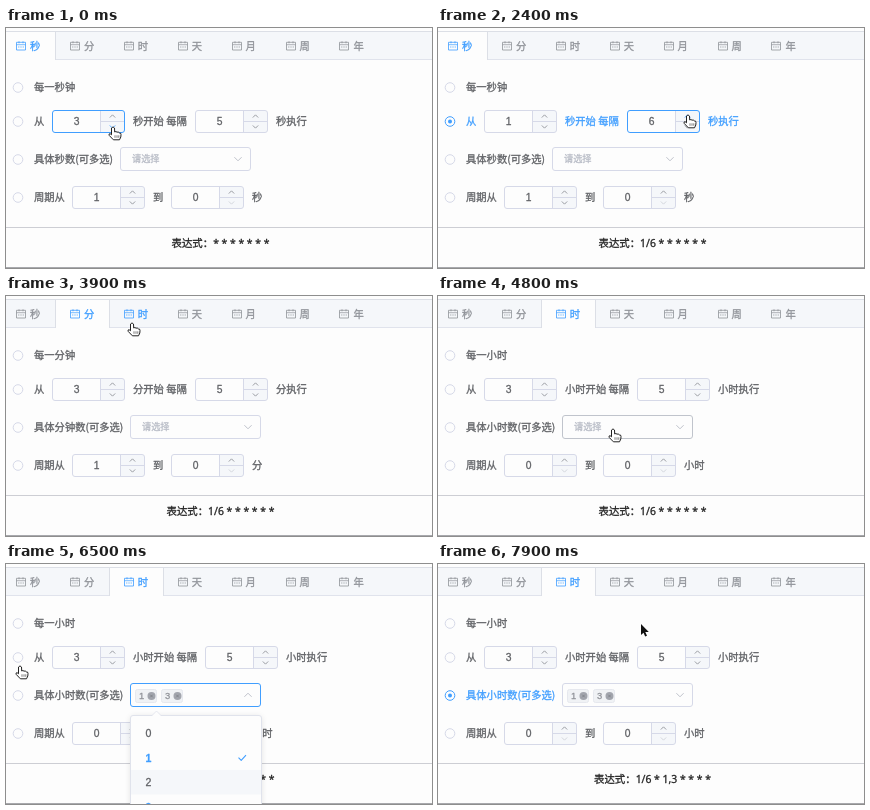
Animation, 426 px wide and 240 px high, one loop 8 s. Source, as an HTML page with a canvas:

```html
<!DOCTYPE html>
<html lang="zh">
<head>
<meta charset="utf-8">
<style>
html, body { margin: 0; width: 100%; height: 100%; overflow: hidden; background: #fdfdfd; }
canvas { display: block; width: 426px; height: 240px; }
</style>
</head>
<body>
<canvas id="stage"></canvas>
<script>
const W = 426, H = 240, LOOP = 8000, STEP = 100;
const BLUE = '#409eff', TEXT = '#606266', GREY = '#909399', PALE = '#b8bcc6',
      EDGE = '#d6d9e8', FILL = '#f5f7fa', PAGE = '#fdfdfd';
const CJK = '"Noto Sans CJK SC", "Noto Sans CJK", "Noto Sans CJK JP", sans-serif';
const SANS = '"Liberation Sans", Arial, sans-serif';
const canvas = document.getElementById('stage');
const g = canvas.getContext('2d');
const dpr = window.devicePixelRatio || 1;
canvas.width = W * dpr;
canvas.height = H * dpr;

// Pointer stops: time, x, y
const route = [
  [0, 107, 99], [1500, 107, 99], [2100, 250, 87], [2700, 250, 87],
  [3350, 82, 20], [3550, 82, 20], [3900, 126, 27], [4250, 132, 24],
  [4750, 175, 133], [5150, 175, 133], [5450, 152, 192], [5700, 152, 192],
  [5950, 150, 244], [6150, 150, 244], [6500, 14, 102], [6700, 12, 130],
  [7050, 12, 130], [7750, 203, 60], [8000, 203, 60]
];

function pointerAt(t) {
  let i = 0;
  while (i < route.length - 2 && route[i + 1][0] <= t) i++;
  const [t0, x0, y0] = route[i], [t1, x1, y1] = route[i + 1];
  const p = (t - t0) / (t1 - t0), e = p * p * (3 - 2 * p);
  return { x: x0 + (x1 - x0) * e, y: y0 + (y1 - y0) * e };
}

function stateAt(t) {
  const tab = t < 3500 ? 0 : t < 4200 ? 1 : 2;
  const from = tab ? 3 : t < 400 ? 3 : t < 800 ? 2 : 1;
  const every = !tab && t >= 2300 ? 6 : 5;
  const done = t >= 6900;
  const picks = [];
  if (t >= 5600) picks.push(1);
  if (t >= 6000) picks.push(3);
  const head = t < 400 ? '*' : t < 800 ? '2/5' : t < 2300 ? '1/5' : '1/6';
  const expr = [head, '*', done ? '1,3' : '*', '*', '*', '*', '*'].join(' ');
  const selected = tab === 0 && t >= 400 ? 1 : tab === 2 && done ? 2 : -1;
  const open = Math.max(0, Math.min(1, (t - 5000) / 200, (7100 - t) / 200));
  return { t, tab, from, every, picks, expr, selected, open, mouse: pointerAt(t) };
}

// A hairline outline gives the text a medium weight
function text(s, x, y, color, size = 10.3, weight = 500, family = CJK, align = 'left') {
  g.font = `${weight} ${size}px ${family}`;
  g.textAlign = align;
  g.textBaseline = 'alphabetic';
  g.fillStyle = g.strokeStyle = color;
  g.lineWidth = 0.3;
  g.lineJoin = 'round';
  g.fillText(s, x, y + size * 0.37);
  g.strokeText(s, x, y + size * 0.37);
}

function rect(x, y, w, h, color) {
  g.fillStyle = color;
  g.fillRect(x, y, w, h);
}

function frame(x, y, w, h, r, fill, stroke) {
  g.beginPath();
  g.roundRect(x + 0.5, y + 0.5, w - 1, h - 1, r);
  if (fill) { g.fillStyle = fill; g.fill(); }
  if (stroke) { g.strokeStyle = stroke; g.lineWidth = 1; g.stroke(); }
}

function line(points, color, width = 1) {
  g.beginPath();
  points.forEach(([x, y]) => g.lineTo(x, y));
  g.strokeStyle = color;
  g.lineWidth = width;
  g.stroke();
}

function disc(x, y, r, color) {
  g.beginPath();
  g.arc(x, y, r, 0, 7);
  g.fillStyle = color;
  g.fill();
}

// dir 1 points down, -1 up
function chevron(x, y, w, dir, color) {
  const h = w / 2 * dir;
  line([[x - w, y - h], [x, y + h], [x + w, y - h]], color, 0.9);
}

function calendar(x, y, color) {
  g.beginPath();
  g.rect(x + 0.5, y + 1.3, 9, 7.7);
  g.strokeStyle = color;
  g.lineWidth = 0.8;
  g.stroke();
  line([[x + 0.5, y + 3.7], [x + 9.5, y + 3.7]], color, 0.7);
  for (const dx of [3, 7]) line([[x + dx, y + 0.3], [x + dx, y + 2.3]], color, 0.8);
  for (const dx of [2.3, 4.5, 6.7]) rect(x + dx, y + 5.5, 1, 1, color);
}

function drawTabs(s) {
  rect(0, 3, W, 29, FILL);
  rect(0, 3, W, 1, '#dcdfe6');
  rect(0, 31, W, 1, '#e0e3ec');
  const pitch = 53.9, left = s.tab ? Math.round(49 + pitch * (s.tab - 1)) : 0;
  const right = Math.round(50 + pitch * s.tab);
  rect(left, 4, right - left, 28, PAGE);
  rect(right - 1, 4, 1, 28, '#dcdfe6');
  if (s.tab) rect(left, 4, 1, 28, '#dcdfe6');
  const over = s.mouse.y > 3 && s.mouse.y < 31 ? Math.floor((s.mouse.x + 5) / pitch) : -1;
  [...'秒分时天月周年'].forEach((name, i) => {
    const x = 10 + pitch * i, color = i === s.tab || i === over ? BLUE : GREY;
    calendar(Math.round(x), 13, color);
    text(name, x + 14, 18, color);
  });
}

function radio(y, on) {
  g.beginPath();
  g.arc(12, y, 4.8, 0, 7);
  g.fillStyle = PAGE;
  g.fill();
  g.strokeStyle = on ? BLUE : EDGE;
  g.lineWidth = 1;
  g.stroke();
  if (on) disc(12, y, 2, BLUE);
}

function stepper(x, y, value, s, atMin) {
  const m = s.mouse, mid = y + 11.5;
  const hot = m.x > x + 48 && m.x < x + 73 && m.y > y && m.y < y + 23;
  frame(x, y, 73, 23, 2.5, PAGE, null);
  rect(x + 48, y + 1, 24, 21, FILL);
  rect(x + 48, y + 1, 1, 21, EDGE);
  rect(x + 48, y + 11, 24, 1, EDGE);
  frame(x, y, 73, 23, 2.5, null, hot ? BLUE : EDGE);
  chevron(x + 60.5, y + 6.2, 2.7, -1, hot && m.y < mid ? BLUE : GREY);
  chevron(x + 60.5, y + 16.8, 2.7, 1, atMin ? '#d0d3da' : hot && m.y >= mid ? BLUE : GREY);
  text(value, x + 24.5, mid, TEXT, 10.3, 400, SANS, 'center');
}

function tag(x, value) {
  frame(x, 125, 22, 14, 2, '#f0f2f5', '#e6e8ee');
  text(value, x + 4, 131.8, GREY, 9.4, 400, SANS);
  const cx = x + 16.5;
  disc(cx, 132, 4, '#a2a5ad');
  line([[cx - 1.3, 130.7], [cx + 1.3, 133.3]], '#777a82', 0.7);
  line([[cx + 1.3, 130.7], [cx - 1.3, 133.3]], '#777a82', 0.7);
}

function select(x, s) {
  const m = s.mouse, open = s.open > 0 && s.t < 6900;
  const over = m.x > x && m.x < x + 131 && m.y > 119 && m.y < 143;
  frame(x, 119, 131, 24, 2.5, PAGE, open ? BLUE : over ? '#c0c4cc' : EDGE);
  if (s.picks.length) s.picks.forEach((p, i) => tag(x + 5 + 26 * i, p));
  else text('请选择', x + 12, 131, PALE, 9.2, 400);
  chevron(x + 118, 131, 3.6, open ? -1 : 1, PALE);
}

function drawRows(s) {
  const unit = ['秒', '分', '小时'][s.tab], long = ['秒钟', '分钟', '小时'][s.tab];
  const counted = ['秒', '分钟', '小时'][s.tab];
  const shift = s.tab === 2 ? 10 : 0;
  const hue = i => i === s.selected ? BLUE : TEXT;
  [59, 93, 131, 169].forEach((y, i) => radio(y + 0.5, i === s.selected));
  text('每一' + long, 28, 59, hue(0));

  text('从', 28, 93, hue(1));
  stepper(46, 82, s.from, s, false);
  text(unit + '开始 每隔', 127, 93, hue(1));
  stepper(189 + shift, 82, s.every, s, false);
  text(unit + '执行', 270 + shift, 93, hue(1));

  text(`具体${counted}数(可多选)`, 28, 131, hue(2));
  select(s.tab ? 124 : 114, s);

  const low = s.tab === 2 ? 0 : 1;
  text('周期从', 28, 169, hue(3));
  stepper(66, 158, low, s, low === 0);
  text('到', 147, 169, hue(3));
  stepper(165, 158, 0, s, true);
  text(unit, 246, 169, hue(3));
}

function drawResult(s) {
  rect(0, 199, W, 1, '#cdced4');
  rect(0, 239, W, 1, '#a8a9ad');
  text('表达式：' + s.expr, 214.5, 215.5, '#222', 10.4, 500, '"Noto Sans", ' + CJK, 'center');
}

function drawMenu(s) {
  if (!s.open) return;
  g.save();
  g.globalAlpha = s.open;
  g.translate(0, 151);
  g.scale(1, s.open);
  g.translate(0, -151);
  g.save();
  g.shadowColor = 'rgba(0,0,0,0.12)';
  g.shadowBlur = 6 * dpr;
  g.shadowOffsetY = 1 * dpr;
  frame(124, 151, 132, 110, 2.5, PAGE, null);
  g.restore();
  frame(124, 151, 132, 110, 2.5, null, '#e0e3ec');
  g.beginPath();
  g.moveTo(146, 152);
  g.lineTo(150.5, 147);
  g.lineTo(155, 152);
  g.fillStyle = PAGE;
  g.fill();
  line([[146, 151.5], [150.5, 147], [155, 151.5]], '#e0e3ec', 0.8);

  const hover = s.t < 5300 ? 0 : s.t < 5800 ? 1 : s.t < 5900 ? 2 : s.t < 6200 ? 3 : 2;
  for (let i = 0; i < 4; i++) {
    const y = 169 + 24.6 * i, on = s.picks.includes(i);
    if (i === hover) rect(125, y - 12.3, 130, 24.6, FILL);
    text(i, 139.5, y, on ? BLUE : TEXT, 10.6, on ? 700 : 400, SANS);
    if (on) line([[232.5, y], [235.2, y + 2.7], [240, y - 2.5]], BLUE, 1.1);
  }
  g.restore();
}

const handPath = new Path2D('M-1.5 1Q0-1.2 1.5 1L1.7 5Q3 3.9 4 5.2Q5.4 4.4 6.2 5.9Q8 5.4 8 7.5L7.8 10L6.5 12.8H.4L-3.8 8.4Q-4.6 6.6-2.9 6.7L-1.5 7.8Z');
const arrowPath = new Path2D('M0 0V11L2.5 8.7L4.2 12.6L6 11.8L4.3 8H7.8Z');

function drawPointer(s) {
  const { x, y } = s.mouse;
  const hand = y < 31 || (y > 81 && y < 105 && x < 320) || (y > 118 && y < 144 && x < 256) ||
    (Math.abs(y - 59) < 8 && x < 70) || (s.open > 0 && y > 150 && x > 124 && x < 255);
  g.save();
  g.translate(x, y);
  g.lineJoin = 'round';
  g.lineWidth = 1;
  if (hand) {
    g.fillStyle = '#fff';
    g.strokeStyle = '#222';
    g.fill(handPath);
    g.stroke(handPath);
    for (const dx of [2, 4, 5.8]) line([[dx, 8.3], [dx, 10.8]], '#444', 0.7);
  } else {
    g.fillStyle = '#111';
    g.strokeStyle = '#fff';
    g.stroke(arrowPath);
    g.fill(arrowPath);
  }
  g.restore();
}

function draw(now) {
  const s = stateAt(Math.floor((now % LOOP) / STEP) * STEP);
  g.setTransform(dpr, 0, 0, dpr, 0, 0);
  rect(0, 0, W, H, PAGE);
  drawTabs(s);
  drawRows(s);
  drawResult(s);
  drawMenu(s);
  drawPointer(s);
}

const start = performance.now();
function tick() {
  draw(performance.now() - start);
  requestAnimationFrame(tick);
}
tick();
</script>
</body>
</html>
```
